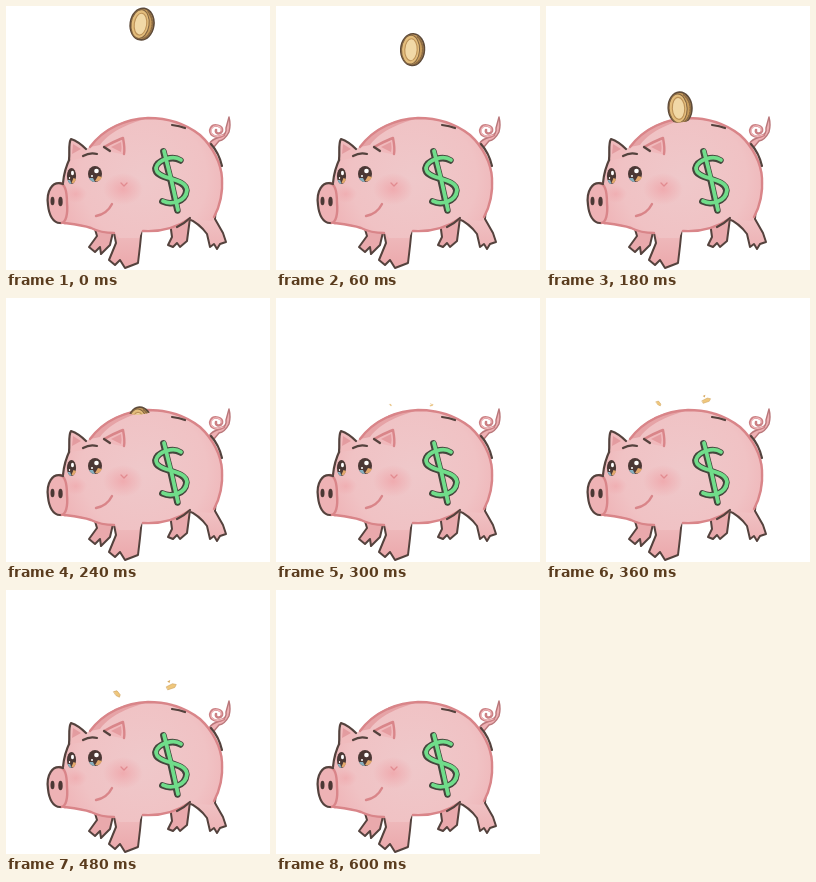
Animation of 264 by 264 pixels, one loop 0.66 s. Source, as an HTML page:

```html
<!DOCTYPE html>
<html lang="en">
<head>
<meta charset="utf-8">
<title>Piggy bank</title>
<style>
html, body { margin: 0; width: 100%; height: 100%; overflow: hidden; background: #fff; }
svg { display: block; width: 100vw; height: 100vh; }
path { stroke-linecap: round; stroke-linejoin: round; }
.line { fill: none; stroke: #d98589; stroke-width: 2.4; }
.dark { fill: none; stroke: #54423d; stroke-width: 2.2; }
.leg { fill: url(#shin); stroke: #54423d; stroke-width: 2; }
.far { fill: #e9a9ac; }
</style>
</head>
<body>
<svg viewBox="0 0 264 264">
  <defs>
    <radialGradient id="hide" gradientUnits="userSpaceOnUse" cx="138" cy="172" r="90">
      <stop offset="0" stop-color="#efc8ca"/>
      <stop offset=".7" stop-color="#f0c2c4"/>
      <stop offset="1" stop-color="#efb4b7"/>
    </radialGradient>
    <linearGradient id="shin" gradientUnits="userSpaceOnUse" x1="0" y1="215" x2="0" y2="260">
      <stop offset="0" stop-color="#f0c0c2"/>
      <stop offset="1" stop-color="#eba9ac"/>
    </linearGradient>
    <radialGradient id="blush">
      <stop offset="0" stop-color="#f0a0a5"/>
      <stop offset="1" stop-color="#f0a0a5" stop-opacity="0"/>
    </radialGradient>
    <clipPath id="above"><path d="M0 0H264V112L148 113Q134 119 121 115L0 120Z"/></clipPath>
  </defs>

  <g id="pig">
    <!-- tail -->
    <path d="M203 138Q206 133 214 131Q221 128 220 122L223 111Q225 119 223 126Q219 134 213 135L208 141Z" fill="#eeb0b3" stroke="#b9777a" stroke-width="1.4"/>
    <path d="M218 129C208 134 202 127 205 122C208 117 217 120 216 125C214 129 209 128 210 124" fill="none" stroke="#cb8084" stroke-width="2.6"/>
    <path d="M217 129C208 133 203 127 206 122C209 118 216 120 215 125" fill="none" stroke="#f1b9bc" stroke-width="1.1"/>

    <!-- far legs -->
    <path class="leg far" d="M164 216L166 231L162 239L167 241L171 237L174 241L181 235L184 212Z"/>
    <path class="leg far" d="M88 220L91 230L83 241L89 246L94 241L95 248L104 239L108 222Z"/>

    <!-- near legs -->
    <path class="leg" d="M181 212Q193 217 201 228L204 241L208 238L211 243L214 238L220 236L217 227L209 213L210 200Z"/>
    <path class="leg" d="M107 222L110 237L103 254L109 259L114 254L119 262L132 257L134 240L136 220Z"/>

    <!-- body and head -->
    <path d="M64 150C61 158 58 166 58 178L56 217C66 218 76 219 85 222C93 226 101 227 109 227L113 232L133 232L136 225C154 226 170 222 183 213L206 215C214 202 218 187 217 172C216 157 208 141 194 129C180 118 163 112 142 112C120 113 98 122 84 141Z" fill="url(#hide)"/>
    <path d="M84 141C96 122 118 112 142 112C126 117 106 123 94 139Z" fill="#e3989c" opacity=".75"/>
    <path class="line" d="M58 217C66 218 76 219 85 222C93 226 101 227 108 227M137 225C154 226 170 222 183 213M208 211C214 200 217 187 216 172C215 157 207 141 194 129C180 118 163 112 142 112C120 113 98 122 84 141"/>
    <path class="dark" stroke-width="1.5" d="M64 152C61 158 58 166 57 177M166 119Q174 120 179 122M205 138Q213 147 216 160M171 221Q179 217 184 212"/>

    <!-- ears -->
    <path d="M63 154C64 146 62 138 64 133C70 135 76 139 80 143L78 152Z" fill="#f0bbbd"/>
    <path d="M66 148L67 138L75 143Z" fill="#e39ca0"/>
    <path class="dark" d="M63 154C64 146 62 138 65 133C71 135 76 139 80 143"/>
    <path d="M98 141C104 138 111 134 117 132C118 137 119 143 118 148C112 148 104 146 98 141Z" fill="#f0b9bc"/>
    <path d="M105 141L115 136Q116 142 115 146Z" fill="#e59ca0"/>
    <path class="line" stroke-width="2" d="M98 141C104 138 111 134 117 132C118 137 119 143 118 148"/>
    <path class="dark" d="M98 141L104 145"/>

    <!-- face -->
    <ellipse cx="117" cy="183" rx="20" ry="16" fill="url(#blush)" opacity=".7"/>
    <ellipse cx="70" cy="188" rx="11" ry="9" fill="url(#blush)" opacity=".5"/>
    <path d="M115 177L118 180L121 177" fill="none" stroke="#e28b90" stroke-width="1.3"/>
    <path class="line" stroke-width="2.8" d="M90 210Q101 208 106 198"/>
    <g id="eyes"></g>
    <path class="dark" d="M77 150Q84 146 91 148"/>

    <!-- snout -->
    <path d="M52 177C44 178 40 188 42 199C43 209 47 217 54 217C60 217 62 208 61 197C61 186 58 177 52 177Z" fill="#eeb2b5"/>
    <path class="line" d="M54 177C59 178 61 187 61 197C62 208 60 217 55 217"/>
    <path class="dark" d="M57 178C46 174 40 186 42 199C43 209 47 217 54 217"/>
    <ellipse cx="46.5" cy="195" rx="2" ry="4.3" fill="#4b3835"/>
    <ellipse cx="54.5" cy="195.5" rx="2.2" ry="4.7" fill="#4b3835"/>

    <!-- dollar -->
    <g id="dollar" fill="none"></g>
  </g>

  <g clip-path="url(#above)">
    <g id="coin">
      <ellipse cx=".6" rx="11.8" ry="15.8" fill="#c99d5c" stroke="#5e4b3a" stroke-width="1.7"/>
      <path d="M5 -13Q13 -5 10 6Q8 12 4 14" fill="none" stroke="#8d6c44" stroke-width="1.8" stroke-dasharray="1.2 1.6"/>
      <ellipse cx="-1.4" cy=".3" rx="9" ry="14.4" fill="#e3bd7c" stroke="#806341" stroke-width="1"/>
      <ellipse cx="-1" cy=".3" rx="6.2" ry="11" fill="#f1d8a6" stroke="#bd9258" stroke-width="1.1"/>
    </g>
  </g>

  <g id="sparkL"><path d="M-4 -3L0 -4L4 1L3 4L-1 2Z" fill="#efc77c" stroke="#cda05b" stroke-width=".8"/></g>
  <g id="sparkR">
    <path d="M-6 1L2 -3L7 -2L5 2L-4 5Z" fill="#efc77c" stroke="#cda05b" stroke-width=".8"/>
    <path d="M-5 -6L-1 -8L-2 -4Z" fill="#d7a961"/>
  </g>
</svg>
<script>
const STEP = 60, STEPS = 11;
const $ = id => document.getElementById(id);

const eye = (x, y, s) => `<g transform="translate(${x} ${y}) scale(${s} 1)">
  <ellipse rx="7" ry="8" fill="#4b3835"/>
  <path d="M0 7Q5 8 7 3L3 2Z" fill="#e2a86c"/>
  <path d="M-6 4Q-4 8 0 8L-2 4Z" fill="#86aebd"/>
  <circle cx="1.5" cy="-3" r="2.3" fill="#fff"/>
  <circle cx="-3" cy="2" r="1" fill="#fff"/></g>`;
$('eyes').innerHTML = eye(65.5, 170, .65) + eye(89, 168, 1);

const sign = (color, width, shift) => `<g stroke="${color}" stroke-width="${width}" transform="translate(${shift})">
  <path d="M175 154C168 149 152 153 150 162C150 174 180 171 181 184C180 196 165 199 157 195"/>
  <path d="M158 145Q166 175 172 204"/></g>`;
$('dollar').innerHTML = sign('#43473c', 6.6, '-.6 .4') + sign('#70dd8a', 3.8, '0 0');

// step: [x, y, scale or tilt]
const coin = { 0: [135.5, 18, 8], 1: [136, 43.5, 3], 2: [134.5, 63, 8], 3: [133.5, 102, -3], 4: [133.5, 125, -3] };
const left = { 5: [114.5, 107, .25], 6: [112.5, 105.5, .6], 7: [111, 104, 1], 8: [111, 104, .8], 9: [110.5, 106, .5] };
const right = { 5: [155.5, 107, .25], 6: [160, 102, .65], 7: [165, 99, 1], 8: [165, 96, .75], 9: [164, 93, .45] };

function place(id, pose, turn) {
  const el = $(id);
  el.style.display = pose ? '' : 'none';
  if (pose) el.setAttribute('transform', `translate(${pose[0]} ${pose[1]}) ${turn}(${pose[2]})`);
}

function draw(t) {
  const i = Math.floor(t / STEP) % STEPS;
  place('coin', coin[i], 'rotate');
  place('sparkL', left[i], 'scale');
  place('sparkR', right[i], 'scale');
}

const start = performance.now();
function tick() {
  draw(performance.now() - start);
  requestAnimationFrame(tick);
}
tick();
</script>
</body>
</html>
```
